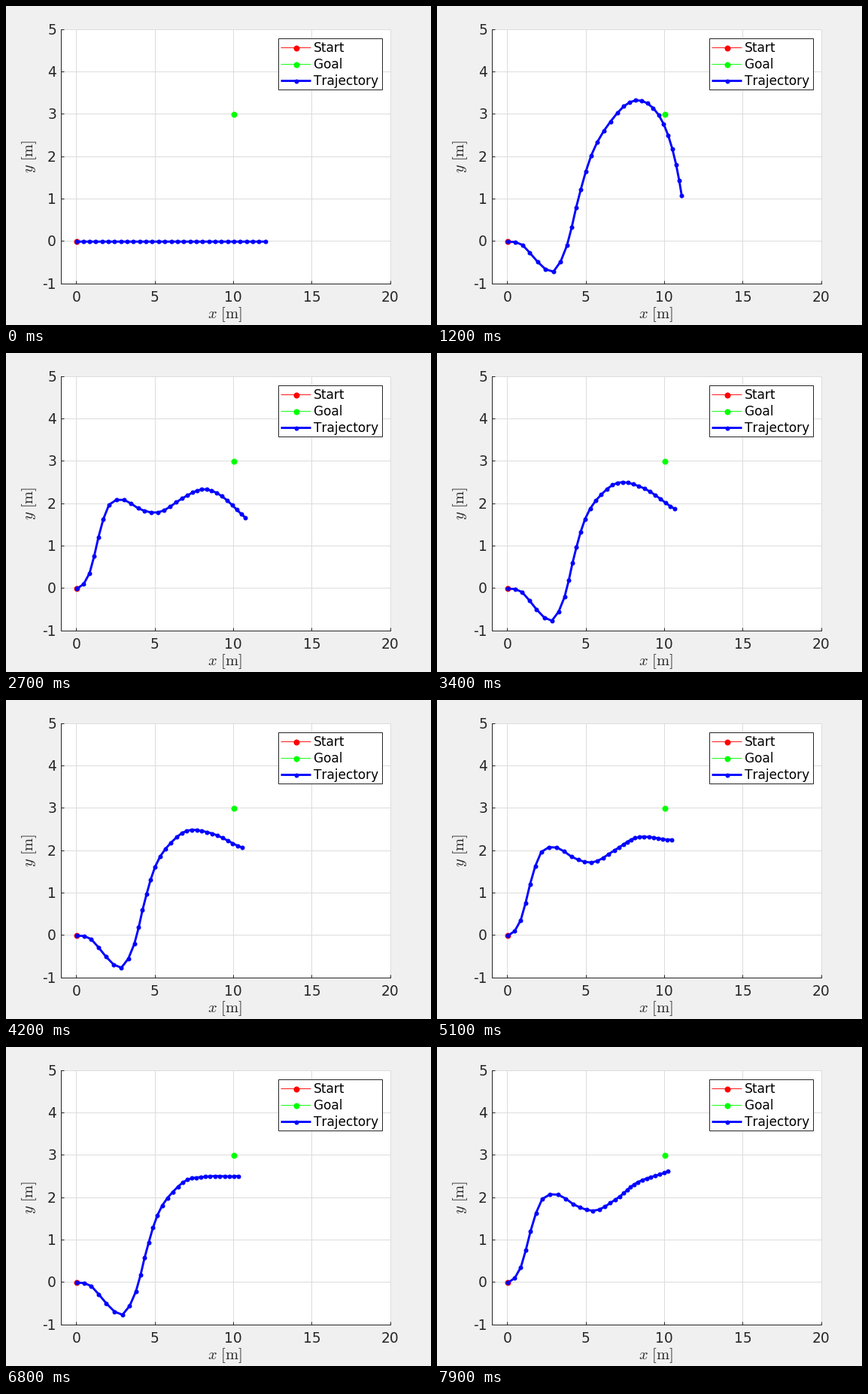
These frames come from a looping animation (565 by 424 pixels, 8000 ms). A matplotlib script:

```python
import matplotlib.pyplot as plt
import numpy as np
from matplotlib.animation import FuncAnimation
from matplotlib.patches import Rectangle

W, H, DPI = 565, 424, 64
PT = 72 / DPI  # points per pixel
LEFT, RIGHT, TOP, BOTTOM = 73, 511, 31, 369
INK, GRID = "#262626", "#dcdcdc"
RED, GREEN, BLUE = "#ff0000", "#00ff00", "#0000ff"

plt.rcParams["font.family"] = "DejaVu Sans"
plt.rcParams["mathtext.fontset"] = "cm"
plt.rcParams["path.snap"] = False
plt.rcParams["text.kerning_factor"] = 6


def X(x):
    return LEFT + (x + 1) * (RIGHT - LEFT) / 21


def Y(y):
    return BOTTOM - (y + 1) * (BOTTOM - TOP) / 6


# The solver flips between two paths, given here in their settled form
# (metres) at a few of the 31 steps.
STEPS = np.arange(31)
KNOTS = np.array([0, 2, 4, 6, 8, 10, 13, 17, 23, 30])
DIP = np.array([(0, 0), (.92, -.08), (1.91, -.49), (2.98, -.76), (3.88, -.21),
                (4.46, .57), (5.29, 1.55), (6.54, 2.20), (8.07, 2.56), (10, 3)])
RISE = np.array([(0, 0), (.83, .365), (1.47, 1.215), (2.24, 1.97), (3.30, 2.07),
                 (4.27, 1.84), (5.55, 1.665), (6.92, 1.91), (8.20, 2.42), (10, 3)])


def curve(p):
    """Cubic Hermite curve through the knots, leaving the start level."""
    m = np.gradient(p, KNOTS, axis=0)
    m[0] = .44, 0
    j = np.clip(np.searchsorted(KNOTS, STEPS, side="right") - 1,
                0, len(KNOTS) - 2)
    h = (KNOTS[j + 1] - KNOTS[j])[:, None]
    t = (STEPS - KNOTS[j])[:, None] / h
    return ((1 + 2 * t) * (1 - t) ** 2 * p[j] + t * (1 - t) ** 2 * h * m[j]
            + t * t * (3 - 2 * t) * p[j + 1] + t * t * (t - 1) * h * m[j + 1])


def trajectory(k):
    if k == 0:
        return STEPS * 0.4, STEPS * 0.0
    x, y = curve(RISE if k % 2 else DIP).T
    s = STEPS / 30
    # Error that decays as the end closes in on the goal
    err = np.exp(-0.0245 * k)
    x = x - err * 1.44 * s * (2 - s) * np.sin(1.5 * np.pi * s)
    y = y + err * 2.57 * s ** 3 * np.cos(np.pi * (1.75 * s - 0.75))
    # Early overshoot that fades out over a few iterations
    bulge = 0.84 / (1 + np.exp((k - 23) / 1.6))
    x = x + bulge * np.sin(np.pi * s ** 1.5)
    y = y + bulge * np.sin(np.pi * s ** 2.5)
    return x, y


fig = plt.figure(figsize=(W / DPI, H / DPI), dpi=DPI, facecolor="#f0f0f0")
ax = fig.add_axes([0, 0, 1, 1])
ax.set_xlim(-0.5, W - 0.5)  # whole numbers are pixel centres
ax.set_ylim(H - 0.5, -0.5)
ax.axis("off")


def line(xs, ys, color, width=1, z=1, **kw):
    kw = {"solid_capstyle": "butt", **kw}
    return ax.plot(xs, ys, color=color, lw=width * PT, zorder=z, **kw)[0]


def dot(x, y, color, size=8, z=3):
    ax.plot([x], [y], "o", color=color, ms=size * PT, mew=0, zorder=z)


def text(x, y, s, px, **kw):
    kw = {"va": "baseline", "color": INK, "zorder": 7, **kw}
    ax.text(x, y, s, fontsize=px * PT, **kw)


ax.add_patch(Rectangle((LEFT, TOP), RIGHT - LEFT, BOTTOM - TOP,
                       fc="white", ec="none", zorder=0))

for v in range(0, 21, 5):
    x = int(X(v))
    line([x, x], [TOP, BOTTOM], GRID)
    line([x, x], [BOTTOM - 4, BOTTOM], INK, z=2)
    text(X(v) - 0.8, 392.5, str(v), 18.67, ha="center")
for v in range(-1, 6):
    y = int(Y(v))
    line([LEFT, RIGHT], [y, y], GRID)
    line([LEFT, LEFT + 4], [y, y], INK, z=2)
    text(66.5, Y(v) + 6.3, str(v), 18.67, ha="right")
line([LEFT, LEFT, RIGHT], [TOP, BOTTOM, BOTTOM], INK, z=2,
     solid_capstyle="projecting", solid_joinstyle="miter")

text(290.5, 410, r"$x\ \mathrm{[m]}$", 20.5, ha="center", va="center")
text(31, 199, r"$y\ \mathrm{[m]}$", 20.5, ha="center", va="center",
     rotation=90)

dot(X(0), Y(0), RED)
dot(X(10), Y(3), GREEN)
path = line([], [], BLUE, 2.9, z=4, marker="o", ms=6 * PT, mew=0,
            solid_joinstyle="round")

# Legend
ax.add_patch(Rectangle((362, 43), 138, 68, fc="white", ec=INK,
                       lw=PT, zorder=5))
rows = [("Start", RED, 0.9, 8), ("Goal", GREEN, 0.9, 8),
        ("Trajectory", BLUE, 2.9, 6)]
for i, (name, color, width, size) in enumerate(rows):
    y = 55 + 22 * i
    line([365, 405], [y, y], color, width, z=6)
    dot(385.5, y, color, size, z=6)
    text(408.7, y + 5.5, name, 17, color="black")


def update(k):
    x, y = trajectory(k)
    path.set_data(X(x), Y(y))
    return [path]


anim = FuncAnimation(fig, update, frames=80, interval=100, repeat=True,
                     repeat_delay=0, blit=False)
plt.show()
```
